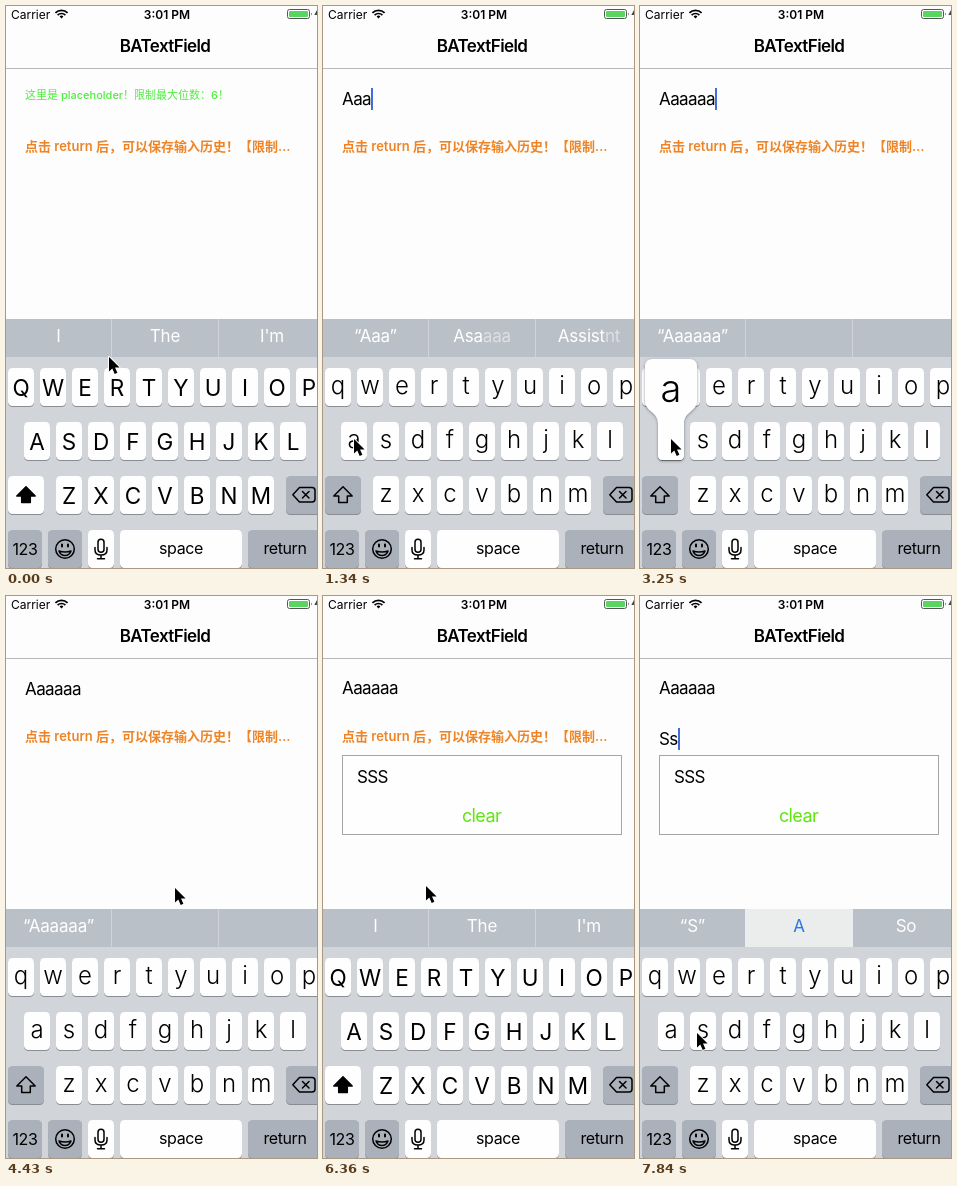
Recreate the animation shown at these times as an HTML page. Size 311 by 562 pixels, loop 7.99 s.

```html
<!DOCTYPE html>
<html lang="zh-CN">
<head>
<meta charset="utf-8">
<title>BATextField</title>
<style>
  html, body { margin: 0; width: 100%; height: 100%; overflow: hidden; background: #fdfdfd; }
  svg { display: block; font-family: Inter, "Noto Sans CJK SC", "Noto Sans CJK", sans-serif; text-spacing-trim: space-all; }
  text { white-space: pre; }
  .mid { text-anchor: middle; }
  .body { font-size: 17px; letter-spacing: -.6px; }
  .label { font-size: 16px; letter-spacing: -.4px; text-anchor: middle; }
  .hint { font-size: 17px; letter-spacing: -.2px; text-anchor: middle; fill: #fff; }
  .upper { font-size: 22.5px; }
  .lower { font-size: 24px; font-weight: 300; }
  .line { fill: none; stroke: #000; stroke-width: 1.5; stroke-linejoin: round; stroke-linecap: round; }
</style>
</head>
<body>
<svg id="stage" width="311" height="562" viewBox="0 0 311 562">
  <defs>
    <filter id="soft" x="-30%" y="-30%" width="160%" height="160%">
      <feDropShadow dx="0" dy="1" stdDeviation="1.6" flood-color="#000" flood-opacity=".4"/>
    </filter>
    <clipPath id="reveal"><rect id="revealBox" x="19" y="159" width="280" height="80"/></clipPath>
  </defs>
  <rect width="311" height="562" fill="#fdfdfd"/>

  <text x="5" y="13" font-size="12">Carrier</text>
  <g fill="none" stroke="#000" stroke-width="1.7">
    <path d="M49.4 6.9a8.6 8.6 0 0 1 12.2 0M51.6 9.1a5.5 5.5 0 0 1 7.8 0"/>
    <path d="M53.6 10.4a2.7 2.7 0 0 1 3.8 0L55.5 12.6Z" fill="#000" stroke="none"/>
  </g>
  <text x="161" y="13" class="mid" font-size="12" font-weight="600">3:01 PM</text>
  <rect x="281.5" y="3.5" width="22" height="9" rx="2" fill="#fff" stroke="#555"/>
  <rect x="283" y="5" width="19" height="6" rx="1" fill="#58d660"/>
  <path d="M305 6.5q1.6 1.5 0 3ZM311 4l-2.7 5H311Z" fill="#444"/>
  <text x="159" y="46" class="mid body" font-weight="600">BATextField</text>
  <path d="M0 62.5H311" stroke="#b9b9bb"/>

  <text id="greenHint" x="19" y="93" font-size="11" font-weight="500" fill="#4cee3c">这里是 placeholder！限制最大位数：6！</text>
  <text id="first" x="19" class="body"></text>
  <text id="orangeHint" x="19" y="145" font-size="13" font-weight="600" fill="#ee8425">点击 return 后，可以保存输入历史！【限制…</text>
  <text id="second" x="19" y="149" class="body"></text>
  <rect id="caret" width="2" height="22" fill="#426be0"/>

  <g id="history">
    <rect id="historyFrame" x="19.5" y="159.5" width="279" fill="#fefefe" stroke="#a5a5a5"/>
    <g clip-path="url(#reveal)">
      <text x="34" y="187" class="body">SSS</text>
      <text x="158.5" y="225.5" class="mid body" style="font-size:18px" fill="#5ee60e">clear</text>
    </g>
  </g>

  <rect y="313" width="311" height="249" fill="#d1d5da"/>
  <rect y="313" width="311" height="38" fill="#bac0c8"/>
  <rect id="highlight" x="105" y="313" width="108" height="38" fill="#ebeded"/>
  <path id="dividers" d="M105.5 313V351M212.5 313V351" stroke="#d0d4da"/>
  <g id="hints"></g>
  <g id="keys"></g>

  <path id="arrow" class="line" d="M20 480.7L10.8 490H15.7V496.6H24.3V490H29.2Z"/>
  <path class="line" d="M293.5 481.5H306q3 0 3 3V493q0 3-3 3H293.5L286.8 488.8ZM296.5 485.5l6.5 6.5M303 485.5l-6.5 6.5"/>
  <g class="line">
    <circle cx="59" cy="543" r="9.3"/>
    <path d="M53 545q6 2 12 0q-1.5 4.5-6 4.5t-6-4.5"/>
    <path d="M56 538.5v2M62 538.5v2" stroke-width="2"/>
    <rect x="92" y="533.2" width="6" height="13" rx="3"/>
    <path d="M89 541.5v2.5q0 5 6 5t6-5v-2.5M95 549v3.5M91.5 552.7h7"/>
  </g>
  <text x="19" y="549" class="label">123</text>
  <text x="175" y="548" class="label">space</text>
  <text x="279" y="548" class="label">return</text>

  <g id="popup">
    <path filter="url(#soft)" fill="#fefefe" d="M13 353H49Q57 353 57 361V395C57 405 44 406 44 417V449Q44 454 39 454H23Q18 454 18 449V417C18 406 5 405 5 395V361Q5 353 13 353Z"/>
    <text id="popupLetter" x="31" y="395.5" class="mid" font-size="38" font-weight="300"></text>
  </g>
  <path id="pointer" d="M0 0V14.6L3.3 11.5L5.7 17L8.4 15.8L6 10.6H10.6Z" fill="#000" stroke="#fff" paint-order="stroke" stroke-width="1.8" stroke-linejoin="round"/>
</svg>
<script>
const LOOP = 7990;
const $ = id => document.getElementById(id);

function add(parent, tag, attrs, text = '') {
  const node = document.createElementNS('http://www.w3.org/2000/svg', tag);
  for (const name in attrs) node.setAttribute(name, attrs[name]);
  node.textContent = text;
  return parent.appendChild(node);
}

function set(id, attrs) {
  for (const name in attrs) $(id).setAttribute(name, attrs[name]);
}

function show(id, on) {
  $(id).style.display = on ? '' : 'none';
}

function addKey(x, y, width, dark) {
  const box = { x, width, height: 38, rx: 4.5 };
  add($('keys'), 'rect', { ...box, y: y + 1, fill: '#898c91' });
  return add($('keys'), 'rect', { ...box, y, fill: dark ? '#abb1bb' : '#fefefe' });
}

const letters = [];
[['QWERTYUIOP', 2, 362], ['ASDFGHJKL', 18, 416], ['ZXCVBNM', 50, 470]].forEach(([row, left, y]) => {
  [...row].forEach((letter, i) => {
    const x = left + 32 * i;
    addKey(x, y, 26);
    letters.push({ letter, y, node: add($('keys'), 'text', { x: x + 13 }) });
  });
});
const shiftKey = addKey(2, 470, 36);
addKey(280, 470, 42, true);
addKey(2, 524, 34, true);
addKey(42, 524, 34, true);
addKey(82, 524, 26);
addKey(114, 524, 122);
addKey(242, 524, 80, true);

const hintNodes = [52.5, 159, 266].map(x => add($('hints'), 'text', { x, y: 336, class: 'hint' }));

// Each step lists what changes at that time; in hints "|" starts the part still fading.
const idle = ['I', 'The', "I'm"];
const steps = [
  [0, { pointer: [103, 351], first: '', second: '', field: 1, caret: false, caps: true, press: '', hints: idle, history: 0, pick: false }],
  [150, { pointer: [84, 376], caret: true }],
  [300, { pointer: [46, 420] }],
  [450, { pointer: [31, 433] }],
  [750, { press: 'A' }],
  [900, { press: '', first: 'A', caps: false, hints: ['“A”', 'And', 'Are'] }],
  [1040, { press: 'A' }],
  [1190, { press: '', first: 'Aa', hints: ['“Aa”', 'As', 'Assist'] }],
  [1340, { first: 'Aaa', hints: ['“Aaa”', 'Asa|aaa', 'Assist|nt'] }],
  [1480, { press: 'A', hints: ['“Aaa”', 'Asaaaa', 'Assistant'] }],
  [1630, { press: '', first: 'Aaaa', hints: ['“Aaa|a”', '|Asaaaa', '|Assistant'] }],
  [1780, { hints: ['“Aaaa”', '', ''] }],
  [1920, { press: 'A' }],
  [2070, { press: '', first: 'Aaaaa', hints: ['“Aaaaa”', '', ''] }],
  [2220, { press: 'A' }],
  [2360, { press: '', first: 'Aaaaaa', hints: ['“Aaaaaa”', '', ''] }],
  [2510, { press: 'A' }],
  [2660, { press: '' }],
  [3250, { press: 'A' }],
  [3400, { press: '' }],
  [3840, { pointer: [176, 486] }],
  [4130, { pointer: [179, 474], caret: false }],
  [4280, { pointer: [177, 390] }],
  [4430, { pointer: [169, 292] }],
  [4580, { pointer: [161, 224], caret: true }],
  [4870, { pointer: [132, 178] }],
  [5020, { pointer: [108, 152], caret: false }],
  [5170, { pointer: [98, 146] }],
  [5610, { field: 2, caret: true, caps: true, history: 17, hints: ['“Aa|a', 'Th|e', "I'm"] }],
  [5760, { history: 55, hints: idle }],
  [5910, { history: 80 }],
  [6200, { pointer: [101, 196], caret: false }],
  [6360, { pointer: [103, 290] }],
  [6510, { pointer: [103, 351] }],
  [6660, { caret: true }],
  [6950, { pointer: [87, 386] }],
  [7100, { pointer: [66, 424], caret: false }],
  [7250, { pointer: [57, 437] }],
  [7540, { press: 'S' }],
  [7690, { press: '', second: 'S', caret: true, caps: false, hints: ['“S”', 'A', 'So'], pick: true }],
  [7840, { second: 'Ss' }]
];

function drawKeys(caps) {
  for (const { letter, y, node } of letters) {
    node.textContent = caps ? letter : letter.toLowerCase();
    node.setAttribute('class', 'mid ' + (caps ? 'upper' : 'lower'));
    node.setAttribute('y', y + (caps ? 27.5 : 26));
  }
  shiftKey.setAttribute('fill', caps ? '#fefefe' : '#abb1bb');
  $('arrow').style.fill = caps ? '#000' : 'none';
}

function drawHints(hints, pick) {
  hintNodes.forEach((node, i) => {
    const [solid, fading = ''] = hints[i].split('|');
    node.textContent = solid;
    if (fading) add(node, 'tspan', { 'fill-opacity': .5 }, fading);
    node.style.fill = pick && i === 1 ? '#2478e8' : '';
  });
  show('highlight', pick);
  show('dividers', !pick);
}

function draw(s) {
  const active = s.field === 1 ? 'first' : 'second';
  $('first').textContent = s.first;
  $('second').textContent = s.second;
  set('first', { y: s.field === 1 ? 99 : 98 });
  show('greenHint', !s.first);
  show('orangeHint', !s.second);

  const width = s[active] ? $(active).getComputedTextLength() : 0;
  set('caret', { x: Math.round(19 + width), y: s.field === 1 ? 82 : 132 });
  show('caret', s.caret);

  show('history', s.history > 0);
  set('historyFrame', { height: Math.max(0, s.history - 1) });
  set('revealBox', { height: s.history });

  drawKeys(s.caps);
  drawHints(s.hints, s.pick);
  show('popup', s.press);
  $('popupLetter').textContent = s.caps ? s.press : s.press.toLowerCase();
  set('popup', { transform: `translate(${s.press === 'S' ? 32 : 0})` });
  set('pointer', { transform: `translate(${s.pointer})` });
}

const start = performance.now();
let shown = -1;

function tick() {
  const time = (performance.now() - start) % LOOP;
  const count = steps.filter(([at]) => at <= time).length;
  if (count !== shown) {
    shown = count;
    draw(Object.assign({}, ...steps.slice(0, count).map(step => step[1])));
  }
  requestAnimationFrame(tick);
}
tick();
</script>
</body>
</html>
```
